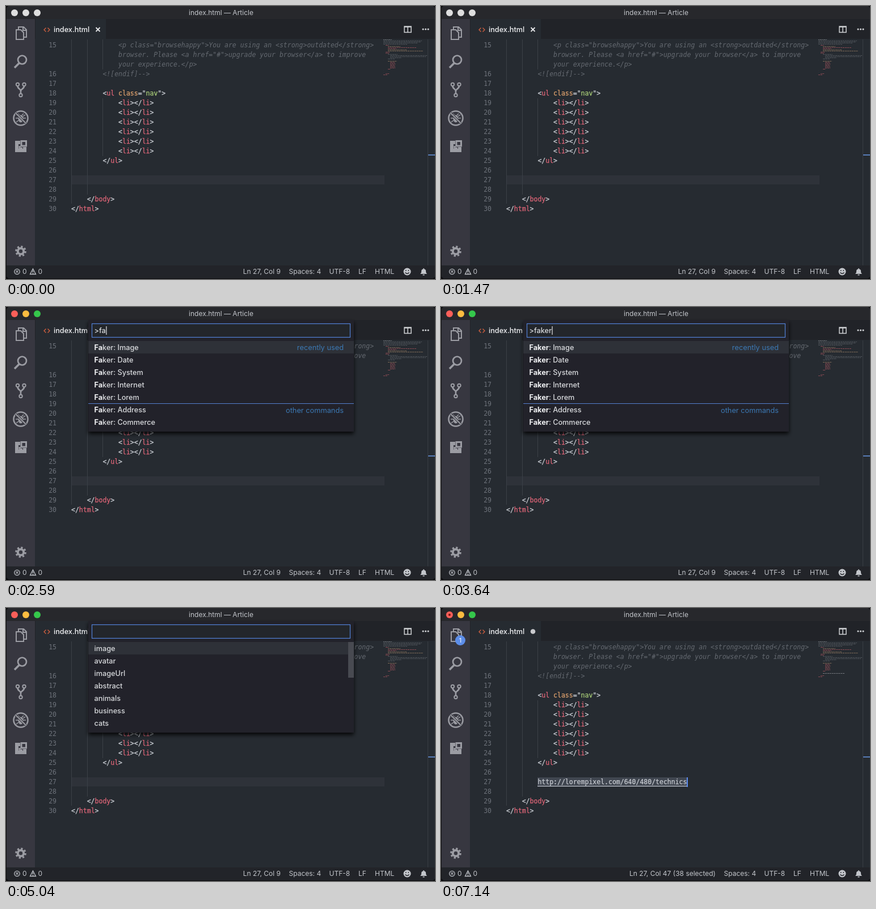
An HTML page for the animation above (7.21 s loop, 756 by 482 pixels).

```html
<!DOCTYPE html>
<html lang="en">
<head>
<meta charset="utf-8">
<title>Editor</title>
<style>
  html, body { margin: 0; width: 100%; height: 100%; overflow: hidden; background: #08080a; }
  svg { display: block; width: 756px; height: 482px; }
  text { white-space: pre; font: 400 12px Inter, Roboto, sans-serif; fill: #c3c6cb; }
  .code text { font: 11.5px "DejaVu Sans Mono", "Liberation Mono", monospace; fill: #c8ccd2; stroke: #c8ccd2; stroke-width: .25; }
  .code .num { fill: #6d727a; stroke: none; text-anchor: end; }
  .code .note { fill: #646970; stroke: none; font-style: italic; }
  .code .tag { fill: #df6678; stroke: #df6678; }
  .code .attr { fill: #dda06d; stroke: #dda06d; }
  .code .str { fill: #a9cd78; stroke: #a9cd78; }
  .tab { font-size: 12.7px; font-weight: 500; fill: #f2f3f5; }
  .list text { font-size: 12.7px; font-weight: 500; fill: #d8dadd; }
  .list .hint { font-size: 12.8px; font-weight: 400; fill: #3c79b4; text-anchor: end; }
  .list .hit { font-weight: 700; fill: #f0f1f3; }
  .line { fill: none; stroke: #9b9ca3; stroke-width: 2; }
</style>
</head>
<body>
<svg id="stage" viewBox="0 0 756 482">
  <defs>
    <clipPath id="window"><rect x="1" y="0" width="755" height="481" rx="5"/></clipPath>
    <clipPath id="pane"><rect x="52" y="59" width="704" height="399"/></clipPath>
    <filter id="shadow" x="-5%" y="-10%" width="110%" height="125%">
      <feDropShadow dx="0" dy="4" stdDeviation="3.5" flood-color="#000" flood-opacity=".85"/>
    </filter>
  </defs>
  <g clip-path="url(#window)">
    <path fill="#262b31" d="M0 0h756v482H0z"/>
    <path fill="#212328" d="M51 23h705v35H51z"/>
    <path fill="#262b31" d="M52 23h124v36H52z"/>
    <path fill="#27282c" d="M0 0h756v23H0z"/>
    <path fill="#373740" d="M0 23h51v435H0z"/>
    <path fill="#222429" d="M0 458h756v24H0z"/>

    <g id="lights"></g>
    <circle id="unsaved" cx="15" cy="12" r="2" fill="#7d1613"/>
    <text x="379" y="16" text-anchor="middle">index.html — Article</text>

    <path d="M70.500 38.500l-3.500 3.500 3.500 3.500M73.500 38.500l3.500 3.500-3.500 3.500" fill="none" stroke="#d4603f" stroke-width="1.300"/>
    <text class="tab" x="84" y="46">index.html</text>
    <path id="close" d="M158.500 38l7 7m0-7l-7 7" stroke="#e6e7e9" stroke-width="1.800"/>
    <circle id="dirty" cx="162" cy="41.500" r="4.300" fill="#c9cace"/>
    <path d="M702 36h12v10.500h-12zM708 36v10M702 37h12" fill="none" stroke="#d0d2d5" stroke-width="1.500"/>
    <g fill="#d0d2d5"><circle cx="735" cy="41" r="1.600"/><circle cx="739.500" cy="41" r="1.600"/><circle cx="744" cy="41" r="1.600"/></g>

    <g class="line">
      <path d="M18 42h8l5 5v12H18zM22 41v-4h9l5 5v13h-5M30 37v6h6"/>
      <circle cx="28.500" cy="95" r="7.500" stroke-width="2.700"/>
      <path d="M23 101l-8 8" stroke-width="3.500"/>
      <circle cx="20.500" cy="138.500" r="2.700"/><circle cx="32" cy="138.500" r="2.700"/><circle cx="26" cy="157.500" r="2.700"/>
      <path d="M20.500 141c0 6 5.500 5 5.500 9v5m0-5c0-4 6-3 6-9" stroke-width="2.600"/>
      <circle cx="26" cy="198" r="12.500" stroke-width="2.500"/>
      <ellipse cx="26" cy="199" rx="4.500" ry="6.500" fill="#9b9ca3" stroke="none"/>
      <path d="M21 190l3 3m7-3l-3 3M17 198h18M18 192l4 3m12-3l-4 3M18 205l4-3m12 3l-4-3" stroke-width="1.500"/>
      <path d="M17 189l18 18" stroke="#373740" stroke-width="4"/><path d="M17 189l18 18" stroke-width="2"/>
      <path d="M17 239h7v4h-3v10h10v-3h4v7H17z" fill="#9b9ca3"/>
      <path d="M27 238.500h8.500v8.500H27zM24 247v4h5" stroke-width="3"/>
      <circle cx="26" cy="433" r="5.200" stroke-width="4"/>
      <circle cx="26" cy="433" r="8.200" stroke-width="3.200" stroke-dasharray="3.220"/>
    </g>
    <g id="badge">
      <circle cx="34" cy="57" r="9" fill="#5d8ee9"/>
      <text x="34" y="61" text-anchor="middle" style="font-size:11px;fill:#fff">1</text>
    </g>

    <rect id="current" x="115" y="299" width="552" height="16" fill="#2e3239"/>
    <path d="M115.500 59v290M143.500 59v274M170.500 59v53M170.500 163v102" stroke="#3b4047"/>
    <rect id="selection" x="170" y="299" width="264" height="17" fill="#404650"/>
    <g id="code" class="code" clip-path="url(#pane)"></g>
    <path id="underline" d="M170 314.500h264" stroke="#c8ccd2"/>
    <rect id="caret" y="299" width="2" height="17" fill="#5d8cf0"/>
    <g id="minimap" opacity=".62"></g>
    <path d="M743.500 59v399" stroke="#3a3e45"/>
    <path d="M744 263h12" stroke="#587db9" stroke-width="2"/>

    <g fill="none" stroke="#bfc2c8" stroke-width="1.300">
      <circle cx="19.500" cy="469" r="4.700"/><path d="M17.500 467l4 4m0-4l-4 4M47.500 464l5 9.500h-10zM47.500 467v3.500m0 1v1.300"/>
    </g>
    <text x="29" y="473">0</text><text x="56.500" y="473">0</text>
    <text id="position" x="484" y="473" text-anchor="end"></text>
    <text x="498.500" y="473">Spaces: 4</text>
    <text x="569.500" y="473">UTF-8</text>
    <text x="621" y="473">LF</text>
    <text x="650" y="473">HTML</text>
    <circle cx="707" cy="469" r="6.500" fill="#c3c6cb"/>
    <path d="M704.700 466v2m4.600-2v2M703.500 470.500q3.500 4 7 0" fill="none" stroke="#222429" stroke-width="1.300"/>
    <path d="M730 473c2-2 2-3 2-5 0-5 8-5 8 0 0 2 0 3 2 5zM734.500 474h3v1.500h-3zM735.300 463h1.400v2h-1.400z" fill="#c3c6cb"/>

    <g id="palette" class="list">
      <path d="M145 23h468v197H145z" fill="#222429" filter="url(#shadow)"/>
      <rect x="151.500" y="29.500" width="455" height="24" fill="#23262b" stroke="#5281d8" stroke-width="1.200"/>
      <path d="M145 60h468v22H145z" fill="#2e3138"/>
      <text id="query" x="155.500" y="46"></text>
      <rect id="inputCaret" y="34" width="1.200" height="15" fill="#e4e5e8"/>
      <g id="items"></g>
      <g id="groups">
        <text class="hint" x="595" y="76">recently used</text>
        <text class="hint" x="595" y="187">other commands</text>
        <path d="M145 170.500h468" stroke="#5480cf" stroke-width="1.200"/>
      </g>
      <path id="scroll" d="M603 60h10v63h-10z" fill="#484a51"/>
    </g>
  </g>
</svg>
<script>
const LOOP = 7210;
const FOCUS = 1750, OPEN = 2100, PICK = 4340, INSERT = 5740, LINK = 6290;
const KEYS = [2380, 2520, 2800, 2980, 3180];
const WORD = 'faker';
const COMMANDS = ['Image', 'Date', 'System', 'Internet', 'Lorem', 'Address', 'Commerce'];
const KINDS = ['image', 'avatar', 'imageUrl', 'abstract', 'animals', 'business', 'cats'];
const LINK_TEXT = 'http://lorempixel.com/640/480/technics';

const $ = id => document.getElementById(id);
const esc = s => s.replace(/&/g, '&amp;').replace(/</g, '&lt;');
const span = (cls, s) => `<tspan class="${cls}">${esc(s)}</tspan>`;
const show = (id, on) => $(id).setAttribute('visibility', on ? 'inherit' : 'hidden');
const blink = elapsed => elapsed >= 0 && elapsed % 1000 < 500;
const tag = (name, close) => esc(close ? '</' : '<') + span('tag', name) + '>';

// Editor rows: [line number, indent, markup]
const item = tag('li') + tag('li', true);
const rows = [
  [15, 12, span('note', '<p class="browsehappy">You are using an <strong>outdated</strong>')],
  ['', 12, span('note', 'browser. Please <a href="#">upgrade your browser</a> to improve')],
  ['', 12, span('note', 'your experience.</p>')],
  [16, 8, span('note', '<![endif]-->')],
  [17, 0, ''],
  [18, 8, esc('<') + span('tag', 'ul') + span('attr', ' class') + '="' + span('str', 'nav') + '"&gt;'],
  ...[19, 20, 21, 22, 23, 24].map(n => [n, 12, item]),
  [25, 8, tag('ul', true)],
  [26, 0, ''],
  [27, 8, `<tspan id="url">${LINK_TEXT}</tspan>`],
  [28, 0, ''],
  [29, 4, tag('body', true)],
  [30, 0, tag('html', true)]
];
$('code').innerHTML = rows.map(([n, indent, markup], i) => {
  const y = 73 + 17 * i;
  return `<text class="num" x="89" y="${y}">${n}</text>` +
    `<text x="${115 + indent * 6.923}" y="${y}">${markup}</text>`;
}).join('');

// Minimap rows: [indent, length, color]
const GREY = '#6a6f76', RED = '#c45e69', TAN = '#b5926f', PALE = '#a5a8ad';
const map = [
  [0, 15, PALE], [0, 68, GREY], [0, 66, GREY], [0, 60, GREY], [0, 42, GREY],
  [4, 6, RED], [8, 22, TAN], [8, 50, RED], [8, 15, RED], [8, 34, TAN], [8, 62, TAN],
  [4, 7, RED], [4, 6, RED], [8, 17, GREY], [12, 65, GREY], [12, 63, GREY], [12, 20, GREY],
  [8, 12, GREY], [0, 0, GREY], [8, 16, TAN],
  ...Array(6).fill([12, 9, RED]),
  [8, 5, RED], [0, 0, GREY], [8, LINK_TEXT.length, PALE], [0, 0, GREY], [4, 7, RED], [0, 7, RED]
];
$('minimap').innerHTML = map.map(([indent, length, color], i) =>
  `<path ${i === 28 ? 'id="mapUrl"' : ''} d="M${665 + indent} ${59.5 + 2 * i}h${length}" ` +
  `stroke="${color}" stroke-width="1.1" stroke-dasharray="${2 + i % 3} .8 3 1"/>`).join('');

$('lights').innerHTML = [15, 35, 55].map(x => `<circle cx="${x}" cy="12" r="6"/>`).join('');
const lights = [...$('lights').children];

function itemMarkup(typed, picking) {
  const labels = picking ? KINDS : COMMANDS.map(c => {
    const head = 'Faker'.slice(0, typed), tail = 'Faker'.slice(typed);
    return span('hit', head) + tail + ': ' + c;
  });
  return labels.map((label, i) =>
    `<text x="155.500" y="${76 + 22 * i - (i === 6 ? .5 : 0)}">${label}</text>`).join('');
}

let listState = '';
function updateList(typed, picking) {
  const state = typed + '/' + picking;
  if (state === listState) return;
  listState = state;
  $('items').innerHTML = itemMarkup(typed, picking);
  $('query').textContent = picking ? '' : '>' + WORD.slice(0, typed);
  const width = picking ? 0 : $('query').getComputedTextLength();
  $('inputCaret').setAttribute('x', 156 + width);
}

function render(t) {
  const focused = t >= FOCUS, open = t >= OPEN && t < INSERT;
  const picking = t >= PICK, inserted = t >= INSERT;
  const typed = KEYS.filter(k => t >= k).length;

  const colors = focused ? ['#fb5f59', '#fcbc40', '#35c74b'] : Array(3).fill('#dedede');
  lights.forEach((light, i) => light.setAttribute('fill', colors[i]));

  for (const id of ['unsaved', 'dirty', 'badge', 'selection', 'url', 'mapUrl']) show(id, inserted);
  show('close', !inserted);
  show('current', !inserted);
  show('underline', t >= LINK);
  $('caret').setAttribute('x', inserted ? 433 : 170);
  show('caret', inserted ? blink(t - INSERT) : !open && blink(t - FOCUS));
  $('position').textContent = inserted ? 'Ln 27, Col 47 (38 selected)' : 'Ln 27, Col 9';

  show('palette', open);
  updateList(typed, picking);
  show('groups', !picking);
  show('scroll', picking);
  const lastInput = picking ? PICK : typed ? KEYS[typed - 1] : OPEN;
  show('inputCaret', blink(t - lastInput));
}

const start = performance.now();
function tick(now) {
  render(Math.max(0, now - start) % LOOP);
  requestAnimationFrame(tick);
}
render(0);
requestAnimationFrame(tick);
</script>
</body>
</html>
```
